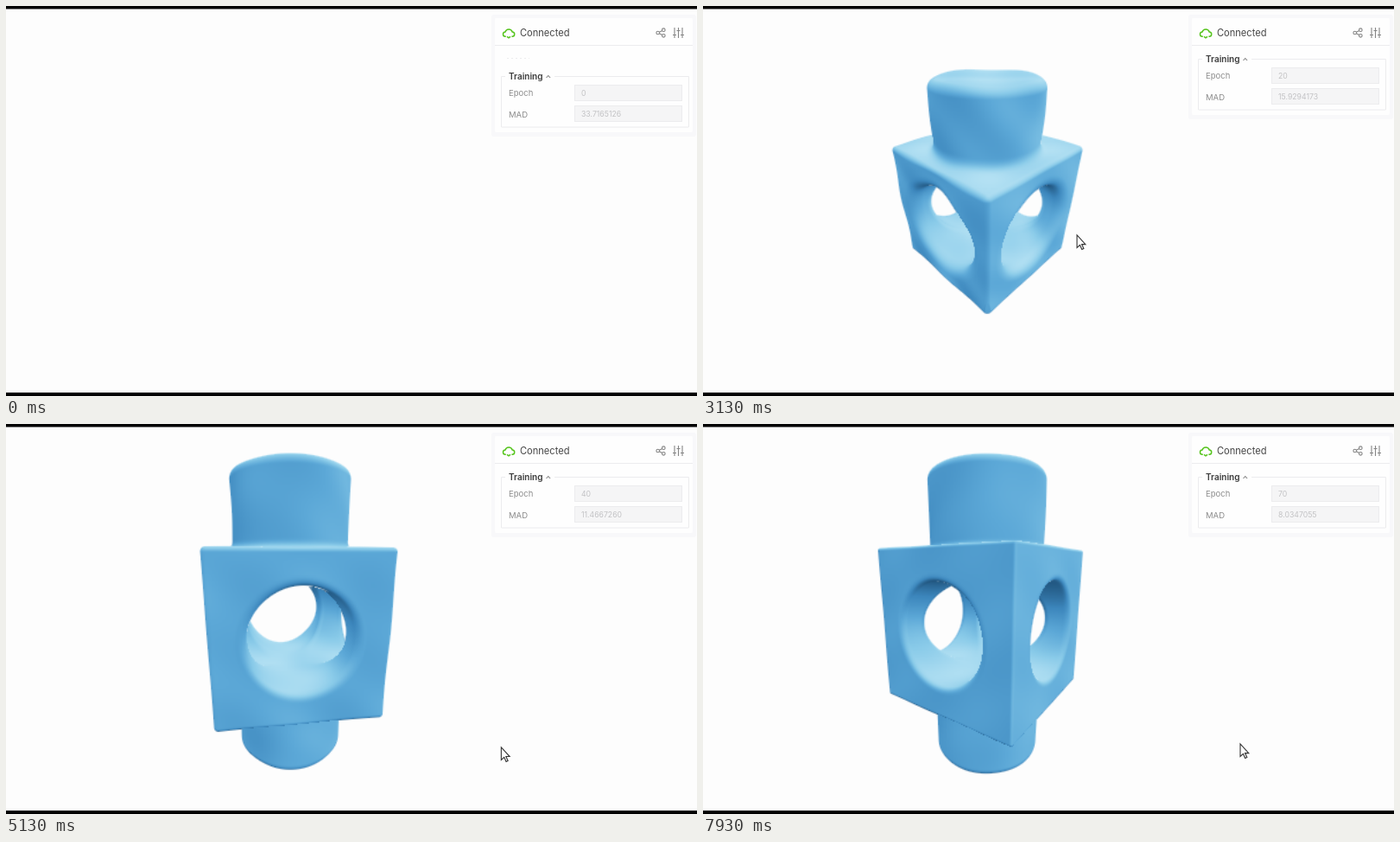
Write an HTML page with a canvas that moves like this. It is 800 by 451 pixels and loops after 8 s.

```html
<!DOCTYPE html>
<html lang="en">
<head>
<meta charset="utf-8">
<title>Training view</title>
<style>
  html, body { margin: 0; width: 100%; height: 100%; overflow: hidden; background: #fdfdfd; }
  canvas { position: absolute; left: 180px; top: 16px; width: 296px; height: 400px; }
  svg { position: absolute; left: 0; top: 0; width: 800px; height: 451px; display: block; }
  text { font-family: Inter, Roboto, sans-serif; }
  .label { font-size: 9.5px; fill: #8c8c8c; }
  .value { font-size: 8.7px; fill: #c2c2c4; }
  .field { fill: #f5f5f6; stroke: #ececee; }
  .rule { fill: none; stroke: #ececee; }
  .icon { fill: none; stroke: #858585; stroke-width: 1.1; }
</style>
</head>
<body>
<canvas id="view" width="222" height="300"></canvas>
<svg viewBox="0 0 800 451">
  <rect width="800" height="3.5"/>
  <rect y="447" width="800" height="4"/>
  <rect id="glow" x="562" y="10" width="237" fill="#f8f8fa" rx="3"/>
  <rect id="panel" x="566" y="14" width="229" fill="#fefefe" rx="2"/>
  <path class="rule" d="M566 45.5H795"/>
  <path d="M578.8 35.3h-.6a2.6 2.6 0 0 1-.2-5.2a4.300 4.300 0 0 1 8.200 0a2.600 2.600 0 0 1-.2 5.200h-.6M580 35.300l2 1.500l2-1.500" fill="none" stroke="#55c41c" stroke-width="1.5"/>
  <text x="595" y="34.6" font-size="11.1" fill="#454545">Connected</text>
  <g class="icon">
    <circle cx="754.7" cy="31" r="1.8"/><circle cx="761.3" cy="27.700" r="1.8"/><circle cx="761.3" cy="34.300" r="1.8"/>
    <path d="M756.4 30.200l3.300-1.700M756.4 31.800l3.300 1.700"/>
    <path d="M774 25v12M778.5 25v12M783 25v12M772 33.5h4M776.5 28.5h4M781 33.5h4"/>
  </g>
  <path id="loading" d="M580 60.5h26" class="rule" stroke-dasharray="2 3"/>
  <g id="group">
    <path class="rule" d="M578 61.5H573.5V120H790.5V61.5H635"/>
    <text x="582" y="65" font-size="10" font-weight="600" fill="#3a3a3a">Training</text>
    <path d="M625.5 63l2.300-2.500l2.300 2.500" class="icon"/>
    <text class="label" x="582" y="84">Epoch</text>
    <text class="label" x="582" y="108.5">MAD</text>
    <rect class="field" x="658.5" y="71.5" width="124" height="18"/>
    <rect class="field" x="658.5" y="95.5" width="124" height="18"/>
    <text class="value" id="epoch" x="666" y="83.5"></text>
    <text class="value" id="mad" x="666" y="108"></text>
  </g>
  <path id="cursor" d="M0 0V14.5L3.4 11.4L5.7 16.5L7.8 15.5L5.5 10.6H9.8Z" fill="#fefefe" stroke="#333" stroke-width="1.1"/>
</svg>
<script>
const LOOP = 8000, STEP = 1000 / 15;
const SCALE = .75, LEFT = 180, TOP = 16, CX = 329, CY = 228.5, FOCAL = 301;
const $ = id => document.getElementById(id);
const ctx = $('view').getContext('2d');
const W = 222, H = 300, img = ctx.createImageData(W, H);
const { abs, min, max, sin, cos, sqrt, PI } = Math;

// Keys: [time, value, ...]
const orbit = [[4740, 0, 34], [4870, 12, 31], [5000, 33, 21], [5130, 53, 14], [5450, 88, 12], [5700, 100, 12]];
const zoom = [[2600, 5.5], [3130, 4.35], [3400, 3.76]];
const pointer = [[3720, 433, 265], [4000, 505, 414], [4300, 528, 434], [4700, 530, 394],
  [4870, 537, 383], [5130, 573, 374], [5600, 622, 370]];
// rounding, blend, taper, wobble, hole radius, hole fillet, foot length
const form = [
  [130, .4, .35, .36, .035, .48, .25, 1.7],
  [2400, .08, .16, .2, .02, .66, .18, 1.8],
  [3670, .05, .14, 0, .02, .66, .18, 1.25],
  [4870, .05, .1, 0, .012, .62, .1, 1.88],
  [5870, .035, .08, 0, .008, .62, .08, 1.92],
  [7930, .025, .07, 0, .005, .62, .08, 1.92]];
const mad = ['33.7165126', '21.4380951', '15.9294173', '13.0976752', '11.4667260', '9.01550469', '8.4629318', '8.0347055'];
const ramp = [[30, 80, 120], [60, 134, 188], [92, 168, 215], [138, 203, 233], [184, 227, 244]];

function at(keys, t) {
  let i = keys.findIndex(k => k[0] > t);
  if (i < 0) i = keys.length;
  if (i === 0 || i === keys.length) return keys[max(0, i - 1)].slice(1);
  const a = keys[i - 1], b = keys[i], u = (t - a[0]) / (b[0] - a[0]);
  return a.slice(1).map((v, n) => v + (b[n + 1] - v) * u);
}

let round, blend, taper, wobble, hole, fillet, foot, phase;

function smin(a, b, k) {
  const h = max(k - abs(a - b), 0);
  return min(a, b) - h * h / (4 * k);
}

function corner(a, b, c, r) {
  const x = max(a + r, 0), y = max(b + r, 0), z = max(c + r, 0);
  return sqrt(x * x + y * y + z * z) + min(max(a, b, c) + r, 0) - r;
}

// Cube pierced along x and z, joined with an upright cylinder
function dist(x, y, z) {
  const rad = sqrt(x * x + z * z);
  let cube = corner(abs(x) - 1, abs(y) - 1, abs(z) - 1, round);
  if (taper > 0) cube = max(cube, (rad + taper * max(-y, 0) - 1.45) * .95);
  const post = corner(rad - .75, max(y - 1.92, -y - foot), -1, .08 + round * .5);
  const body = smin(cube, post, blend);
  const bore = smin(sqrt(x * x + y * y), sqrt(z * z + y * y), .06) - hole;
  const d = -smin(-body, bore, fillet);
  return d + wobble * sin(5.3 * x + phase) * sin(4.700 * y + 1) * sin(5.900 * z - phase);
}

function render(t) {
  const [turn, tilt] = at(orbit, t), [D] = at(zoom, t);
  [round, blend, taper, wobble, hole, fillet, foot] = at(form, t);
  phase = t / 2600;
  const a = (turn - 45) * PI / 180, e = tilt * PI / 180;
  const ca = cos(a), sa = sin(a), ce = cos(e), se = sin(e);
  const ox = -D * ce * sa, oy = D * se, oz = D * ce * ca;
  const px = img.data;
  px.fill(0);
  for (let j = 0; j < H; j++) for (let i = 0; i < W; i++) {
    const u = (LEFT + (i + .5) / SCALE - CX) / FOCAL;
    const v = (CY - TOP - (j + .5) / SCALE) / FOCAL;
    const zv = -v * se - ce, dx = u * ca - zv * sa, dy = v * ce - se, dz = u * sa + zv * ca;
    const x1 = -ox / dx, xw = 1.06 / abs(dx), y1 = -oy / dy, yw = 2 / abs(dy), z1 = -oz / dz, zw = 1.06 / abs(dz);
    const near = max(x1 - xw, y1 - yw, z1 - zw), far = min(x1 + xw, y1 + yw, z1 + zw);
    if (!(near < far)) continue;
    const len = sqrt(1 + u * u + v * v);
    let s = near, best = 9, hit = near;
    for (let n = 0; n < 56 && s < far; n++) {
      const d = dist(ox + dx * s, oy + dy * s, oz + dz * s);
      if (d / s < best) { best = d / s; hit = s; }
      if (d < .002) { best = 0; break; }
      s += d / len * .95;
    }
    const alpha = 1 - best * FOCAL * SCALE;
    if (alpha <= 0) continue;
    const x = ox + dx * hit, y = oy + dy * hit, z = oz + dz * hit, h = .012;
    const p = dist(x + h, y - h, z - h), q = dist(x - h, y - h, z + h);
    const r = dist(x - h, y + h, z - h), w = dist(x + h, y + h, z + h);
    let nx = p - q - r + w, ny = r + w - p - q, nz = q + w - p - r;
    const m = sqrt(nx * nx + ny * ny + nz * nz) || 1;
    nx /= m; ny /= m; nz /= m;
    const side = nx * ca + nz * sa;
    const mottle = (.02 + wobble * 2) * sin(5 * x + 3 * y + phase) * sin(4 * y - 5 * z + 1);
    const shade = min(.999, max(0, .47 + .44 * ny + .13 * side + mottle)) * 4;
    const k = shade | 0, f = shade - k, o = (j * W + i) * 4;
    for (let c = 0; c < 3; c++) px[o + c] = ramp[k][c] + (ramp[k + 1][c] - ramp[k][c]) * f;
    px[o + 3] = 255 * min(1, alpha);
  }
  ctx.putImageData(img, 0, 0);
}

function draw(t) {
  const ready = t > 130;
  if (ready) render(t); else ctx.clearRect(0, 0, W, H);
  const shift = ready ? 0 : 20;
  $('glow').setAttribute('height', 121 + shift);
  $('panel').setAttribute('height', 112 + shift);
  $('group').setAttribute('transform', `translate(0 ${shift})`);
  $('loading').style.display = ready ? 'none' : '';
  const n = min(7, max(0, Math.floor((t - 200) / 1050)));
  $('epoch').textContent = n * 10;
  $('mad').textContent = mad[n];
  const [x, y] = at(pointer, t);
  $('cursor').setAttribute('transform', `translate(${x} ${y})`);
  $('cursor').style.display = t < 2600 ? 'none' : '';
}

const start = performance.now();
let last = -1;
function tick() {
  // the small lead keeps times rounded to 10 ms on their own step
  const step = Math.floor((performance.now() - start) % LOOP / STEP + .1);
  if (step !== last) draw((last = step) * STEP);
  requestAnimationFrame(tick);
}
tick();
</script>
</body>
</html>
```
